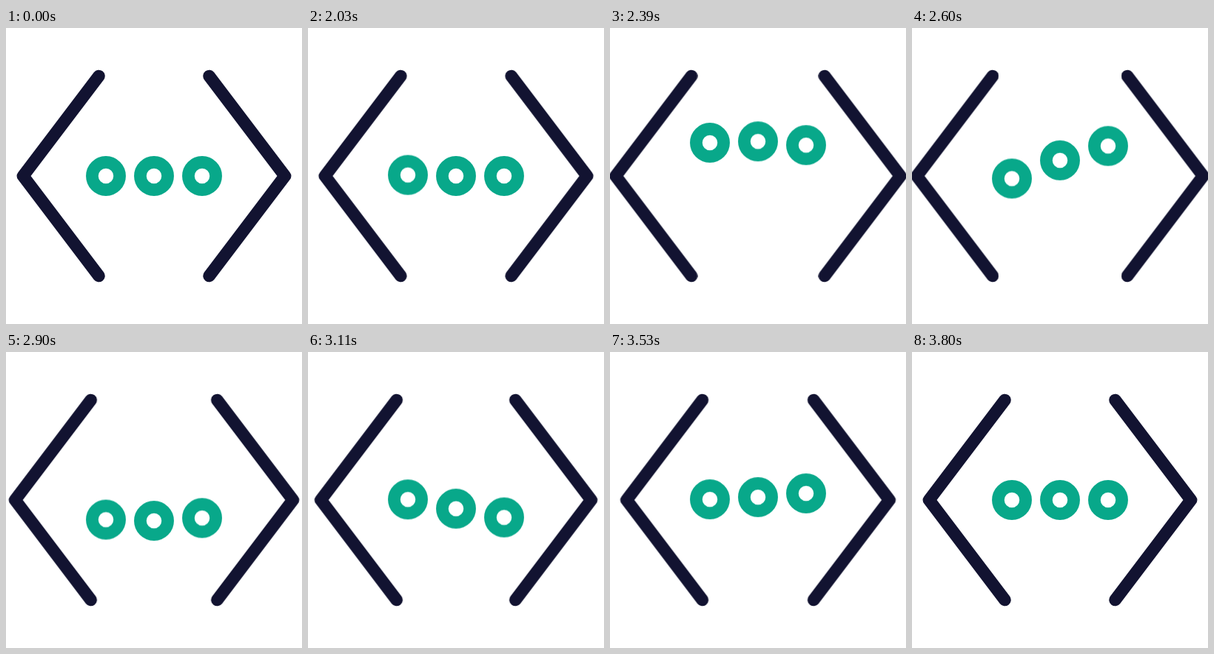
Write an HTML page without scripts that moves like this. It is 400 px wide and 400 px high and loops after 3830 ms.

```html
<!DOCTYPE html>
<html lang="en">
<head>
<meta charset="utf-8">
<title>Code loader</title>
<style>
  html, body { margin: 0; width: 100%; height: 100%; overflow: hidden; background: #fff; }
  svg { display: block; width: 100%; height: 100%; }

  .bracket, .dot { fill: none; stroke-width: 16.7px; }
  .bracket {
    stroke: #121331;
    stroke-linecap: round;
    stroke-linejoin: round;
    animation: spread 3830ms infinite;
  }
  .dot {
    stroke: #08a88a;
    animation: bounce 3830ms var(--delay, 0ms) infinite;
  }

  /* Rest for 2 s, open quickly, close slowly */
  @keyframes spread {
    0%, 52.219% { transform: translateX(0); animation-timing-function: cubic-bezier(.33, 0, .67, 1); }
    64.752% { transform: translateX(-17px); animation-timing-function: cubic-bezier(.33, 0, .37, 1); }
    99.217%, 100% { transform: translateX(0); }
  }

  /* Up, down, small rebound, settle */
  @keyframes bounce {
    0%, 52.219% { transform: translateY(0); animation-timing-function: cubic-bezier(.33, 0, .33, 1); }
    60.966% { transform: translateY(-47px); animation-timing-function: cubic-bezier(.42, 0, .42, 1); }
    74.021% { transform: translateY(28.2px); animation-timing-function: cubic-bezier(.42, 0, .42, 1); }
    86.292% { transform: translateY(-10px); animation-timing-function: cubic-bezier(.33, 0, .33, 1); }
    94.778%, 100% { transform: translateY(0); }
  }
</style>
</head>
<body>
<svg viewBox="0 0 400 400">
  <path class="bracket" d="M125.4 65 L23.1 200 L125.4 335"/>
  <g transform="matrix(-1 0 0 1 400 0)">
    <path class="bracket" d="M125.4 65 L23.1 200 L125.4 335"/>
  </g>
  <circle class="dot" cx="135" cy="200" r="18.6"/>
  <circle class="dot" cx="200" cy="200" r="18.6" style="--delay: 85ms"/>
  <circle class="dot" cx="265" cy="200" r="18.6" style="--delay: 170ms"/>
</svg>
</body>
</html>
```
